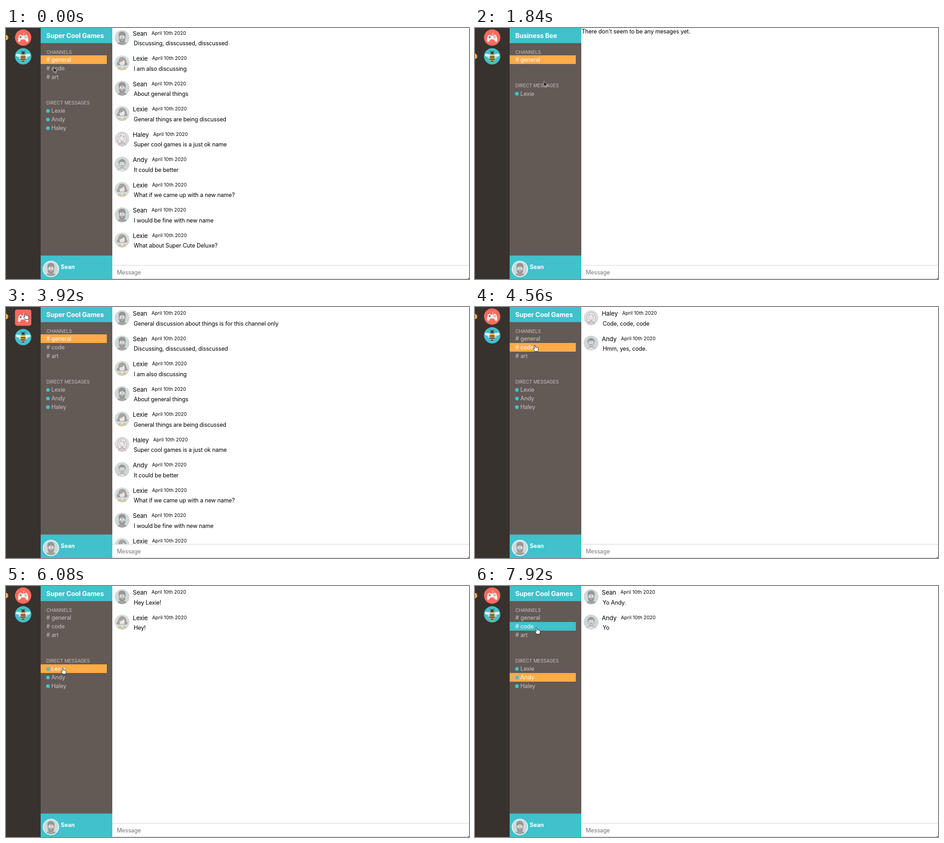
An HTML page that plays this animation: 1015x551 px, repeating every 8 s.

```html
<!DOCTYPE html>
<html lang="en">
<head>
<meta charset="utf-8">
<title>Team chat</title>
<style>
html, body { margin: 0; width: 100%; height: 100%; overflow: hidden; background: #fff; }
svg { display: block; width: 1015px; height: 551px; }
text { font: 12.4px Inter, "Open Sans", sans-serif; letter-spacing: -.008em; white-space: pre; }
.name { font-size: 13.3px; }
.date, .label { font-size: 10.2px; letter-spacing: 0; }
.date { font-size: 10.4px; letter-spacing: .008em; }
.label, .row { fill: #c8c4c1; }
.on { fill: #fff; }
.title { font-size: 14.2px; font-weight: 700; fill: #fff; }
.user { font-size: 12.6px; font-weight: 700; fill: #fff; }
.hint { fill: #757575; }
.band { shape-rendering: crispEdges; }
</style>
</head>
<body>
<svg viewBox="0 0 1015 551">
  <defs>
    <clipPath id="disc"><circle r="16.4"/></clipPath>
    <g id="Sean" clip-path="url(#disc)" stroke="#7d7d7d" stroke-width=".7">
      <circle r="16.4" fill="#cfd8da" stroke="none"/>
      <path d="M-11 17C-11 12-8 10.5-3 10H3C8 10.5 11 12 11 17Z" fill="#a5a6a6"/>
      <path d="M-6.5-5Q0-8 6.5-5V4C6 13-6 13-6.5 4Z" fill="#dcdad9"/>
      <path d="M-7-2V-7Q-7-13 1-12.5Q8-13 7-2L5.500-6H-5.500Z" fill="#999897"/>
      <path d="M-6.500 2Q-3 4 0 2.500Q3 4 6.500 2C6.500 13-6.500 13-6.500 2Z" fill="#969594" stroke="none"/>
      <path d="M-2 5.500H2" stroke="#e2e2e2" stroke-width="1.200"/>
      <g fill="#f3f3f3"><circle cx="-3.200" cy="-1.500" r="2.500"/><circle cx="3.200" cy="-1.500" r="2.500"/></g>
    </g>
    <g id="Lexie" clip-path="url(#disc)" stroke="#8c8784" stroke-width=".7">
      <circle r="16.4" fill="#cfdddc" stroke="none"/>
      <path d="M-7-6C-6-14 6-14 8-6Q9 0 12 3Q9 6 6 5H-6Q-9 6-12 3Q-9 0-7-6Z" fill="#aba39e"/>
      <path d="M-9 17Q-9 10-2 9.500V6H2V9.500Q9 10 9 17Z" fill="#dccaa6"/>
      <path d="M-3 9.500Q0 13 3 9.500V6H-3Z" fill="#eeeae7" stroke="none"/>
      <path d="M-6-2Q2-3 4-8Q5-4 6-2C7 9.500-7 9.500-6-2Z" fill="#eeebe9"/>
      <path d="M-3.500 0H-2M2 0H3.500M-2 4Q0 5.500 2 4" fill="none"/>
    </g>
    <g id="Haley" clip-path="url(#disc)" stroke="#938d90" stroke-width=".8">
      <circle r="16.4" fill="#dedfe0" stroke="none"/>
      <path d="M-8-4C-8-15 9-15 8-4L11 0 8 2 11 6 7 9H-7L-11 6-8 2-11-1Z" fill="#f2efef"/>
      <path d="M-9 17Q-9 10-2 9V5H2V9Q9 10 9 17Z" fill="#d8c9cd"/>
      <path d="M-5.500-3-2-8 1-5 5.500-3C6 9-6 9-5.500-3Z" fill="#f3eeee"/>
      <path d="M-5-4-2-10M5-3 2-9M-3 0H-1.500M1.500 0H3M-1.500 4H1.500M-9 4-6 7M9 4 6 7" fill="none"/>
    </g>
    <g id="Andy" clip-path="url(#disc)" stroke="#838383" stroke-width=".7">
      <circle r="16.4" fill="#ced6d9" stroke="none"/>
      <path d="M-11 17Q-10 10.500-3 10V5H3V10Q10 10.500 11 17Z" fill="#dededd"/>
      <path d="M-6.500-5C-7 13 7 13 6.500-5Q0-8-6.500-5Z" fill="#dad8d7"/>
      <path d="M-7-1C-9-13 9-14 7-1Q6-5 5-6Q-1-4-5-6Z" fill="#9a9999"/>
      <path d="M-3.500-1H-2M2-1H3.500" fill="none"/>
      <path d="M-3 4.500Q0 2 3 4.500M-1.500 7.500H1.500" fill="none" stroke-width="1.300"/>
    </g>
    <g id="pad">
      <path d="M0-4C0-8 2-7 2-11" fill="none" stroke="#e9e3df" stroke-width="1.200"/>
      <path d="M-7-6Q-4-7-3-4H3Q4-7 7-6C10-5 12 4 11 8Q9 12 6 7L4 4H-4L-6 7Q-9 12-11 8C-12 4-10-5-7-6Z" fill="#f3efed"/>
      <path d="M-11 7Q-9 12-6 7L-4 4H4L6 7Q9 12 11 7" fill="none" stroke="#d7d0cf" stroke-width="1.200"/>
      <path d="M-8-1H-3M-5.500-3.500V1.500" stroke="#6c6870" stroke-width="1.700"/>
      <g fill="#f5695e"><circle cx="5.500" cy="-3" r="1.100"/><circle cx="5.500" cy="1" r="1.100"/></g>
      <g fill="#5fb9c4"><circle cx="3.500" cy="-1" r="1.100"/><circle cx="7.500" cy="-1" r="1.100"/></g>
    </g>
    <g id="bee">
      <path d="M-2-9-4.500-12.500M2-9 4.500-12.500" stroke="#3d3838" stroke-width="1"/>
      <g fill="#e6eceb"><path d="M-3-3C-8-6-16-7-16-3S-8 2-3 0Z"/><path d="M3-3C8-6 16-7 16-3S8 2 3 0Z"/></g>
      <path d="M-3 0Q-11 1-10 4T-3 2ZM3 0Q11 1 10 4T3 2Z" fill="#c7d6d6"/>
      <circle cy="-7.500" r="3.400" fill="#453e3c"/>
      <path d="M-4.500-3Q0-7 4.500-3C6.500 4 4 10 0 13.500C-4 10-6.500 4-4.500-3Z" fill="#f6b544"/>
      <path d="M-5 1.500H5M-4.800 6H4.800M-2.500 10.500H2.500" stroke="#3d3838" stroke-width="2.400"/>
    </g>
    <path id="arrow" d="M0 0V11.400L2.600 9 4.400 13.300 6.200 12.500 4.400 8.300H8Z" fill="#111" stroke="#fff" stroke-width=".8"/>
    <path id="hand" d="M-1.300 1C-1.300-.6 1-.6 1.200 1L1.700 4.500Q3.500 3.500 4 5Q5.800 4.300 6.200 5.800Q8 5.300 8 7.500Q8 10 6.700 13.500H.2Q-1.500 10.500-3.200 8.300C-4 6.500-2 6.200-.6 7.800Z" fill="#fff" stroke="#111" stroke-width=".9" stroke-linejoin="round"/>
  </defs>
  <rect width="1015" height="551" fill="#fff"/>
  <g id="messages"></g>
  <rect x="232" y="521" width="790" height="29.5" fill="#fff" stroke="#cfcfcf"/>
  <text class="hint" x="243" y="541">Message</text>
  <path d="M1015 547.5V551H1011.5Q1014 550 1015 547.5Z" fill="#444"/>
  <rect width="76" height="551" fill="#37322e"/>
  <rect x="76" width="157" height="551" fill="#635955"/>
  <path d="M76 0H233V33.300H76ZM76 499.500H233V551H76Z" fill="#40c1cc"/>
  <g transform="translate(98.5 529)"><use href="#Sean"/><circle r="17" fill="none" stroke="#fff" stroke-width="1.6"/></g>
  <text class="user" x="120" y="528.5">Sean</text>
  <g id="servers"></g>
  <g id="sidebar"></g>
  <use id="cursor"/>
</svg>
<script>
const LOOP = 8000, STEP = 80, ROW = 18.9, PITCH = 55.55;
const TEAL = '#40c1cc', ORANGE = '#ffab48';
const $ = id => document.getElementById(id);

const general = [
  ['Sean', 'General discussion about things is for this channel only'],
  ['Sean', 'Discussing, disscussed, disscussed'],
  ['Lexie', 'I am also discussing'],
  ['Sean', 'About general things'],
  ['Lexie', 'General things are being discussed'],
  ['Haley', 'Super cool games is a just ok name'],
  ['Andy', 'It could be better'],
  ['Lexie', 'What if we came up with a new name?'],
  ['Sean', 'I would be fine with new name'],
  ['Lexie', 'What about Super Cute Deluxe?']
];
const servers = [
  { title: 'Super Cool Games', channels: ['general', 'code', 'art'], people: ['Lexie', 'Andy', 'Haley'], icon: 'pad', color: '#fb6a5e', y: 21 },
  { title: 'Business Bee', channels: ['general'], people: ['Lexie'], icon: 'bee', color: '#43bfca', y: 62.2 }
];
// start time, server, selected row, messages, scroll offset
const views = [
  [0, 0, 'general', general, 58],
  [1360, 1, 'general', []],
  [2240, 1, 'Lexie', []],
  [3280, 1, 'general', []],
  [3920, 0, 'general', general],
  [4560, 0, 'code', [['Haley', 'Code, code, code'], ['Andy', 'Hmm, yes, code.']]],
  [5280, 0, 'art', [['Haley', 'Art, art, art'], ['Andy', 'Hmm, yes, art.']]],
  [6000, 0, 'Lexie', [['Sean', 'Hey Lexie!'], ['Lexie', 'Hey!']]],
  [6880, 0, 'Haley', [['Sean', 'Hi Haley.'], ['Haley', 'Hi']]],
  [7600, 0, 'Andy', [['Sean', 'Yo Andy.'], ['Andy', 'Yo']]]
];
// time, x, y of the pointer tip
const path = [
  [0, 104, 86], [240, 34, 58], [320, 34, 58], [400, 34, 55], [480, 34, 55], [560, 33, 57],
  [720, 33, 57], [1200, 39, 60], [1440, 39, 60], [1840, 151, 117], [2080, 124, 141],
  [2480, 124, 141], [2880, 127, 80], [3120, 128, 69], [3360, 128, 69], [3680, 42, 14],
  [4000, 42, 14], [4400, 131, 84], [4720, 131, 84], [5040, 133, 102], [5280, 133, 102],
  [5840, 123, 179], [6080, 124, 180], [6400, 124, 180], [6720, 122, 220], [6960, 122, 220],
  [7360, 124, 197], [7600, 124, 197], [7920, 135, 92], [LOOP, 135, 92]
];
const POINTER_AWAKE = 800;

const text = (cls, x, y, s) => `<text class="${cls}" x="${x}" y="${y}">${s}</text>`;
const viewAt = t => views.filter(v => v[0] <= t).pop();

function pointer(t) {
  const i = Math.max(1, path.findIndex(p => p[0] > t));
  const [t0, x0, y0] = path[i - 1], [t1, x1, y1] = path[i];
  const k = (t - t0) / (t1 - t0);
  return [x0 + (x1 - x0) * k, y0 + (y1 - y0) * k];
}

function rowsOf(server) {
  const { channels, people } = server;
  const top = 60.2, dmTop = top + channels.length * ROW + 55.3;
  return [
    ...channels.map((id, i) => ({ id, y: top + i * ROW })),
    ...people.map((id, i) => ({ id, y: dmTop + i * ROW, dm: true }))
  ];
}

function hoverAt(t) {
  if (t < POINTER_AWAKE) return null;
  const [x, y] = pointer(t);
  const server = servers.find(s => Math.abs(x - 37.6) < 18 && Math.abs(y - s.y) < 18);
  if (server) return server.icon;
  if (x < 76 || x > 221) return null;
  const row = rowsOf(servers[viewAt(t)[1]]).find(r => y >= r.y && y < r.y + ROW);
  return row ? row.id : null;
}

// Eases an icon between circle and rounded square over three steps.
const hoverAmount = (icon, t) =>
  [0, 1, 2].filter(k => hoverAt(t - k * STEP) === icon).length / 3;

function drawMessages([, , , list, scroll = 0]) {
  if (!list.length) return text('', 233.5, 12, "There don't seem to be any mesages yet.");
  return list.map(([who, words], i) => {
    const y = i * PITCH - scroll;
    return `<use href="#${who}" transform="translate(254.5 ${y + 23.5})"/>
      <text class="name" x="278" y="${y + 19}">${who}<tspan class="date" dx="9.7" dy="-2">April 10th 2020</tspan></text>` +
      text('', 280, y + 40.5, words);
  }).join('');
}

function drawServers(active, t) {
  let push = 0;
  return servers.map((s, i) => {
    const h = hoverAmount(s.icon, t), y = s.y + push, cy = y + 2.3 * h;
    push += 4 * h;
    return (i === active ? `<circle cx="-1" cy="${y}" r="6" fill="${ORANGE}"/>` : '') +
      `<g transform="translate(37.6 ${cy})"><rect x="-17.9" y="-17.9" width="35.8" height="35.8" rx="${17.9 - 12.9 * h}" fill="${s.color}"/><use href="#${s.icon}"/></g>`;
  }).join('');
}

function drawSidebar([, index, selected], hover) {
  const server = servers[index], rows = rowsOf(server);
  const dmTop = rows.find(r => r.dm).y;
  return text('title', 88.3, 21.5, server.title) + text('label', 88.5, 56.5, 'CHANNELS') +
    text('label', 88.5, dmTop - 4, 'DIRECT MESSAGES') +
    rows.map(({ id, y, dm }) => {
      const on = id === selected, lit = on || id === hover, mid = y + 9.7;
      const band = lit ? `<rect class="band" x="76" y="${y}" width="145" height="${ROW}" fill="${on ? ORANGE : TEAL}"/>` : '';
      const dot = !dm ? '' : on
        ? `<rect x="88.8" y="${mid - 3.3}" width="7" height="7" fill="${TEAL}"/>`
        : `<circle cx="92" cy="${mid + .2}" r="4.1" fill="${TEAL}"/>`;
      return band + dot + text(lit ? 'on' : 'row', dm ? 99.5 : 88.5, mid + 4.5, dm ? id : '# ' + id);
    }).join('');
}

let lastTime = -1, lastView = null;
function render(now) {
  const t = Math.floor(now % LOOP / STEP) * STEP;
  if (t === lastTime) return;
  lastTime = t;
  const view = viewAt(t), hover = hoverAt(t), [x, y] = pointer(t);
  if (view !== lastView) $('messages').innerHTML = drawMessages(lastView = view);
  $('servers').innerHTML = drawServers(view[1], t);
  $('sidebar').innerHTML = drawSidebar(view, hover);
  $('cursor').setAttribute('href', hover ? '#hand' : '#arrow');
  $('cursor').setAttribute('transform', `translate(${x} ${y})`);
}
const start = performance.now();
function tick() {
  render(performance.now() - start);
  requestAnimationFrame(tick);
}
tick();
</script>
</body>
</html>
```
